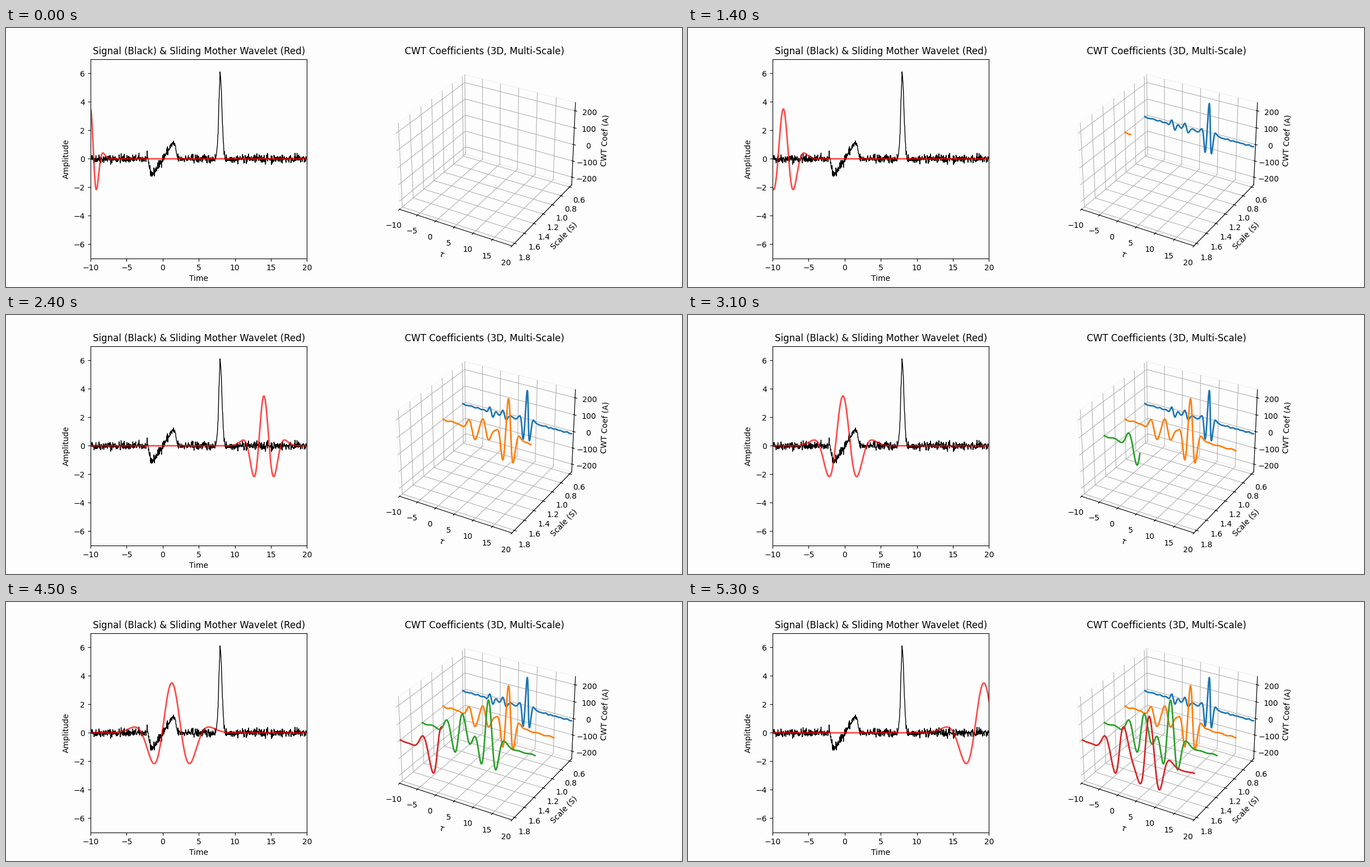
These frames come from a looping animation (1207 by 464 pixels, 5400 ms). A matplotlib script:

```python
import numpy as np
import matplotlib.pyplot as plt
from matplotlib.animation import FuncAnimation

N = 800                        # samples of time and of shift
STEP = 60                      # samples travelled per frame
SCALES = [0.6, 1.0, 1.4, 1.8]
FRAMES = 54
Z_MAX = 248
BG = "#fdfdfd"

t = np.linspace(-10, 20, N)


def wavelet(u):
    """Fourth derivative of a Gaussian, with a peak of 1."""
    return (u**4 - 6 * u**2 + 3) / 3 * np.exp(-u**2 / 2)


def make_signal():
    np.random.seed(42)
    ramp = 0.8 * t * np.exp(-(t / 1.85) ** 10)
    spike = 5.8 * np.exp(-10 * (t - 8) ** 2)
    return ramp + spike + 0.15 * np.random.randn(N)


signal = make_signal()
lag = t[None, :] - t[:, None]
coefs = np.array([wavelet(lag / s) @ signal for s in SCALES])
coefs *= Z_MAX / np.abs(coefs).max()

# The small excess keeps the pixel size from rounding down.
fig = plt.figure(figsize=(12.0701, 4.6401), dpi=100, facecolor=BG)
grid = fig.add_gridspec(1, 2, width_ratios=[1, 1.2])

ax = fig.add_subplot(grid[0], facecolor=BG)
ax.set(xlim=(-10, 20), ylim=(-7, 7), xlabel="Time", ylabel="Amplitude",
       title="Signal (Black) & Sliding Mother Wavelet (Red)")
ax.plot(t, signal, color="black", lw=1)
mother, = ax.plot([], [], color="red", lw=2, alpha=0.7)

ax3 = fig.add_subplot(grid[1], projection="3d", facecolor=BG)
ax3.set_title("CWT Coefficients (3D, Multi-Scale)")
ax3.set_xlim(-10, 20)
ax3.set_ylim(SCALES[-1] + 0.05, SCALES[0] - 0.05)
ax3.set_zlim(-Z_MAX, Z_MAX)
ax3.set_xlabel(r"$\tau$")
ax3.set_ylabel("Scale (S)")
ax3.set_zlabel("CWT Coef (A)")
for axis in (ax3.xaxis, ax3.yaxis, ax3.zaxis):
    axis.pane.fill = False
curves = [ax3.plot([], [], [], color=f"C{i}", lw=2)[0]
          for i in range(len(SCALES))]


def update(frame):
    active, pos = divmod(frame * STEP, N)
    mother.set_data(t, 3.5 * wavelet((t - t[pos]) / SCALES[active]))
    for i, (curve, s) in enumerate(zip(curves, SCALES)):
        n = N if i < active else pos + 1 if i == active else 0
        curve.set_data_3d(t[:n], np.full(n, s), coefs[i, :n])
    return [mother, *curves]


anim = FuncAnimation(fig, update, frames=FRAMES, interval=100,
                     repeat=True, repeat_delay=0, blit=False)
plt.show()
```
